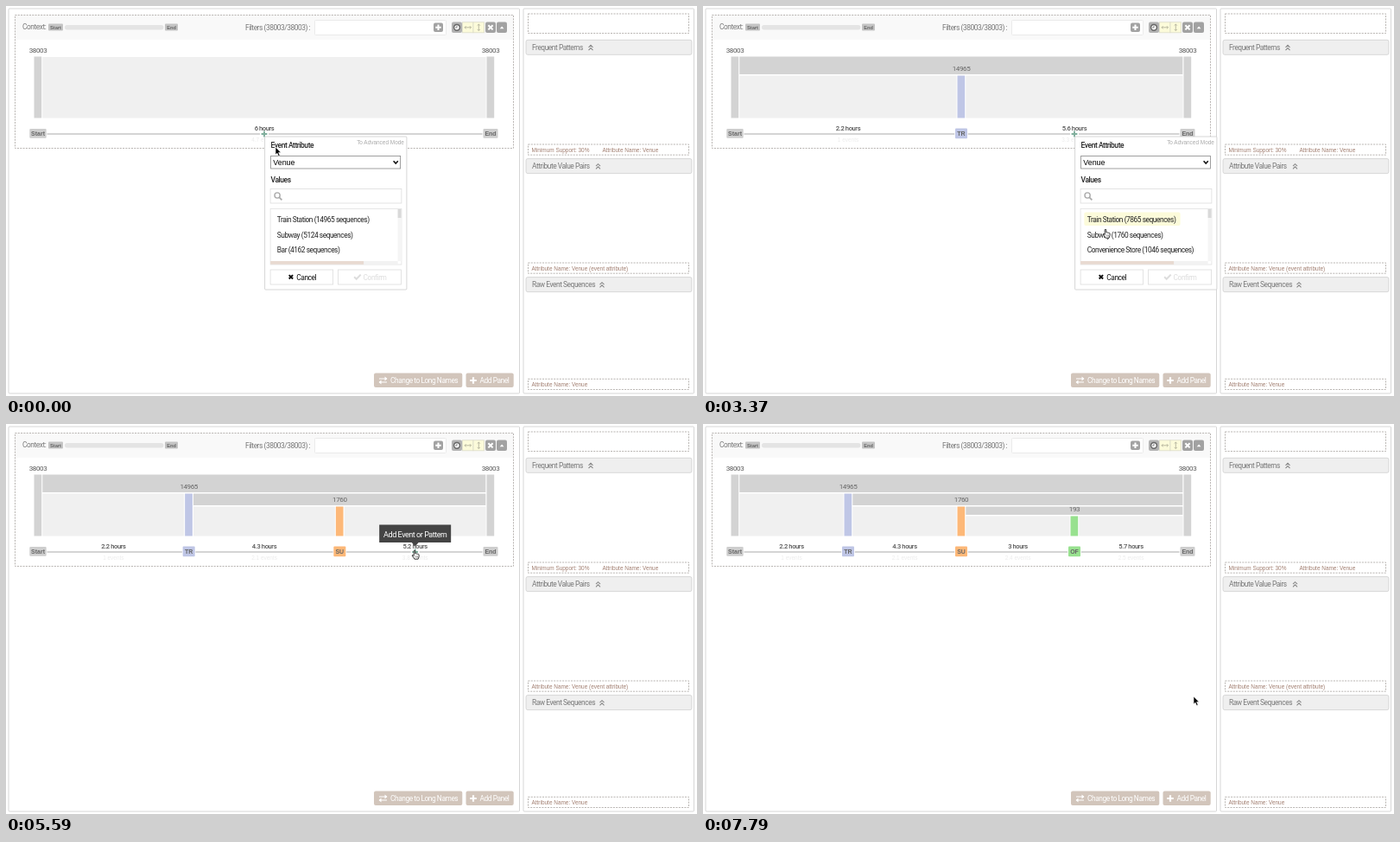
An HTML page for the animation above (7.99 s loop, 800 by 451 pixels).

```html
<!DOCTYPE html>
<html lang="en">
<head>
<meta charset="utf-8">
<title>Event sequence explorer</title>
<style>
  html, body { margin: 0; width: 100%; height: 100%; overflow: hidden; background: #fff; }
  svg { display: block; width: 100%; height: 100%; }
  text { font: 8.4px Roboto, sans-serif; letter-spacing: -.054em; white-space: pre; }
  .title { font-weight: 500; font-size: 8.5px; }
  .hours { font-weight: 500; font-size: 7.6px; }
  .count { font-size: 8.1px; }
  .tip { font-size: 9.1px; }
  .small, .faint, .select, .badge, .tiny { font: 6.45px "Liberation Sans", Arial, sans-serif; letter-spacing: 0; }
  .select { font-size: 8.9px; }
  .badge { font-size: 7px; font-weight: bold; }
  .tiny { font-size: 5.7px; font-weight: bold; }
</style>
</head>
<body>
<svg viewBox="0 0 800 451"><g id="page"></g><g id="live"></g></svg>
<script>
const LOOP = 7990;
const START_X = 37, END_X = 561;

const EVENTS = [
  { code: 'TR', count: 14965, color: '#bfc6e6', top: 58, bar: 80 },
  { code: 'SU', count: 1760, color: '#fdb878', top: 80, bar: 95 },
  { code: 'OF', count: 193, color: '#98e18f', top: 95, bar: 106 },
];

// One entry per number of events on the axis.
const GAPS = [
  [['6 hours', '4.7 events']],
  [['2.2 hours', '1 events'], ['5.6 hours', '3.3 events']],
  [['2.2 hours', '1 events'], ['4.3 hours', '2.1 events'], ['5.2 hours', '3.8 events']],
  [['2.2 hours', '1 events'], ['4.3 hours', '2.1 events'], ['3 hours', '2.4 events'], ['5.7 hours', '2.5 events']],
];

const CHOICES = [
  ['Train Station (14965 sequences)', 'Subway (5124 sequences)', 'Bar (4162 sequences)'],
  ['Train Station (7865 sequences)', 'Subway (1760 sequences)', 'Convenience Store (1046 sequences)'],
  ['Subway (732 sequences)', 'Train Station (715 sequences)', 'Office (193 sequences)'],
];

// [start ms, events on axis, cursor, x, y, options]
const STEPS = [
  [0, 0, 'arrow', 312, 163, { dialog: 1 }],
  [190, 0, 'arrow', 320, 205, { dialog: 1 }],
  [390, 0, 'hand', 338, 244, { dialog: 1, hover: 0 }],
  [590, 0, 'hand', 338, 244, { dialog: 1, pick: 0 }],
  [790, 0, 'arrow', 378, 284, { dialog: 1, pick: 0 }],
  [990, 0, 'hand', 420, 319, { dialog: 1, pick: 0 }],
  [1190, 0, 'hand', 420, 319, { plus: 1 }],
  [1370, 1, 'arrow', 420, 319, { fade: 1 }],
  [1570, 1, 'arrow', 423, 260, {}],
  [1770, 1, 'arrow', 427, 185, {}],
  [1970, 1, 'hand', 429, 146, { plus: 1, tip: 1 }],
  [2370, 1, 'hand', 429, 146, { plus: 1 }],
  [2590, 1, 'arrow', 432, 160, { dialog: 1 }],
  [2790, 1, 'arrow', 440, 195, { dialog: 1 }],
  [2990, 1, 'arrow', 450, 226, { dialog: 1 }],
  [3190, 1, 'hand', 461, 244, { dialog: 1, hover: 0 }],
  [3370, 1, 'hand', 466, 258, { dialog: 1, hover: 0 }],
  [3590, 1, 'hand', 467, 262, { dialog: 1, hover: 1 }],
  [3790, 1, 'hand', 467, 262, { dialog: 1, pick: 1 }],
  [3990, 1, 'arrow', 505, 288, { dialog: 1, pick: 1 }],
  [4190, 1, 'arrow', 535, 309, { dialog: 1, pick: 1 }],
  [4590, 1, 'arrow', 535, 309, { plus: 1 }],
  [4790, 2, 'arrow', 535, 309, { fade: 1 }],
  [4990, 2, 'arrow', 520, 260, {}],
  [5190, 2, 'arrow', 490, 190, {}],
  [5390, 2, 'hand', 473, 146, { plus: 1 }],
  [5590, 2, 'hand', 473, 146, { plus: 1, tip: 1 }],
  [5790, 2, 'arrow', 477, 160, { dialog: 1 }],
  [5990, 2, 'arrow', 492, 229, { dialog: 1 }],
  [6190, 2, 'hand', 502, 246, { dialog: 1, hover: 0 }],
  [6390, 2, 'hand', 509, 263, { dialog: 1, hover: 1 }],
  [6590, 2, 'hand', 516, 281, { dialog: 1, hover: 2 }],
  [6790, 2, 'hand', 516, 281, { dialog: 1, pick: 2 }],
  [6990, 2, 'arrow', 585, 306, { dialog: 1, pick: 2 }],
  [7190, 2, 'arrow', 568, 315, { dialog: 1, pick: 2 }],
  [7370, 2, 'arrow', 568, 315, { plus: 1 }],
  [7590, 3, 'arrow', 568, 315, { fade: 1 }],
  [7790, 3, 'arrow', 568, 315, {}],
];

// Boxes are given by their left, top, right and bottom edges.
const box = (l, t, r, b, fill, extra = '') =>
  `<rect x="${l}" y="${t}" width="${r - l}" height="${b - t}" fill="${fill}" ${extra}/>`;
const border = (color, radius = 0) => `stroke="${color}" stroke-width=".8" rx="${radius}"`;
const dashed = (l, t, r, b) => box(l, t, r, b, 'none', 'stroke="#b0aca9" stroke-width=".9" stroke-dasharray="2 1.3"');
const text = (x, y, label, fill, cls = '', anchor = 'start') =>
  `<text x="${x}" y="${y}" fill="${fill}" class="${cls}" text-anchor="${anchor}">${label}</text>`;
const centered = (x, y, label, fill, cls) => text(x, y, label, fill, cls, 'middle');
const line = (d, color, width = 1) => `<path d="${d}" fill="none" stroke="${color}" stroke-width="${width}"/>`;
const shape = (d, fill, extra = '') => `<path d="${d}" fill="${fill}" ${extra}/>`;
const plus = (x, y, r, color, width) => line(`M${x - r} ${y}h${2 * r}M${x} ${y - r}v${2 * r}`, color, width);
const cross = (x, y, r, color) =>
  line(`M${x - r} ${y - r}l${2 * r} ${2 * r}M${x + r} ${y - r}l${-2 * r} ${2 * r}`, color, 2);

function header(y, label, chevronX) {
  const chevron = dy => `M${chevronX - 2.5} ${y + dy}l2.5 -2.5l2.5 2.5`;
  return box(602, y, 794, y + 17, '#efefef', border('#d0d0d0', 2)) +
    text(609, y + 11.8, label, '#777') +
    line(chevron(8.6) + chevron(11.8), '#888', 1.1);
}

function drawPage() {
  const note = '#a17e70', tan = '#d2c5bb';
  return box(0, 0, 800, 451, '#fff') +
    box(3, 3, 594.5, 448, '#fff', border('#ccc', 1)) +
    box(599, 3, 796.5, 448, '#fff', border('#ccc', 1)) +
    box(10.5, 10.5, 587, 39, '#f9f9f9') + dashed(10.5, 10.5, 587.5, 164.5) +
    text(19, 27, 'Context:', '#777') +
    box(49, 20.5, 66, 28.5, '#c4c4c4', 'rx="1"') + centered(57.5, 26.7, 'Start', '#666', 'tiny') +
    box(68, 22, 182.5, 27.5, '#e4e4e4', 'rx="2.7"') +
    box(184, 20.5, 199, 28.5, '#c4c4c4', 'rx="1"') + centered(191.5, 26.7, 'End', '#666', 'tiny') +
    text(277, 28.3, 'Filters (38003/38003) :', '#777') +
    box(357.5, 16.5, 509.5, 33.5, '#fff', border('#e6e6e6', 1)) +
    box(495, 19.5, 506, 30, '#a2a2a2', 'rx="2"') + plus(500.5, 24.8, 3.2, '#fff', 2) +
    box(516, 18.5, 528, 31, '#b2b2b2', 'rx="2"') +
    '<circle cx="522" cy="24.8" r="3.4" fill="#fff" stroke="#666" stroke-width="1.5"/>' +
    line('M522 22.8v2.2h-1.8', '#666', .8) +
    box(528.5, 18.8, 541, 30.8, '#fcfbda', border('#dddcc8')) +
    box(541, 18.8, 553.5, 30.8, '#fcfbda', border('#dddcc8')) +
    line('M531 24.8h7.5M532.6 23.2l-1.6 1.6l1.6 1.6M536.9 23.2l1.6 1.6l-1.6 1.6', '#b5b49c', .9) +
    line('M547.3 21v7.5M545.7 22.6l1.6 -1.6l1.6 1.6M545.7 26.9l1.6 1.6l1.6 -1.6', '#b5b49c', .9) +
    box(555, 18.5, 567, 31, '#a2a2a2', 'rx="2"') + cross(561, 24.8, 2.6, '#fff') +
    box(568, 18.5, 580, 31, '#a2a2a2', 'rx="2"') + shape('M571.7 26.2l2.4 -2.8l2.4 2.8z', '#fff') +
    dashed(604.5, 9, 790.5, 31.5) +
    header(39.3, 'Frequent Patterns', 677) +
    header(176.6, 'Attribute Value Pairs', 685.5) +
    header(313.6, 'Raw Event Sequences', 690) +
    [160, 297, 431.3].map(y => dashed(604.5, y, 790.5, y + 12.2)).join('') +
    text(608.5, 168.8, 'Minimum Support: 30%', note, 'small') +
    text(690.5, 168.8, 'Attribute Name: Venue', note, 'small') +
    text(608.5, 305.6, 'Attribute Name: Venue (event attribute)', note, 'small') +
    text(608.5, 439.8, 'Attribute Name: Venue', note, 'small') +
    box(426, 424.5, 528.3, 441, tan, 'rx="2"') + text(445, 436, 'Change to Long Names', '#fff') +
    line('M432 431h8.5M432.5 435h8.5', '#fff', 1.2) +
    shape('M438.5 428.6l3 2.4l-3 2.4zM434.5 432.6l-3 2.4l3 2.4z', '#fff') +
    box(532.5, 424.5, 587.7, 441, tan, 'rx="2"') + text(548.5, 436, 'Add Panel', '#fff') +
    plus(541, 433, 3.8, '#fff', 2.2);
}

const nodeX = (index, events) => START_X + (END_X - START_X) * index / (events + 1);
const lastGapX = events => nodeX(events + .5, events);

function drawChart(events, showPlus) {
  let out = '';
  for (const [x, name, half] of [[START_X, 'Start', 9.7], [END_X, 'End', 8.5]]) {
    out += box(x - 4.5, 58.5, x + 4.2, 129.5, '#d3d3d3') +
      centered(x, 53.5, '38003', '#555', 'count') +
      box(x - half, 142, x + half, 152.7, '#cecece', 'rx="1"') +
      centered(x, 150, name, '#666', 'badge');
  }
  GAPS[events].forEach(([hours, average], i) => {
    const left = nodeX(i, events), right = nodeX(i + 1, events), mid = (left + right) / 2;
    const top = events ? EVENTS[Math.min(i, events - 1)].bar : 58.5;
    const from = left + (i ? 7.8 : 10.5), to = right - (i < events ? 7.8 : 9.5);
    const hole = showPlus && i === events;
    out += box(left + 5.3, top + .5, right - 5.5, 129.5, '#f0f0f0') +
      line(hole ? `M${from} 148H${mid - 5}M${mid + 5} 148H${to}` : `M${from} 148H${to}`, '#c6c6c6', 1.3) +
      centered(mid, 144, hours, '#555', 'hours') +
      centered(mid, 157, average, '#ececec', 'faint');
  });
  EVENTS.slice(0, events).forEach(({ code, count, color, top, bar }, i) => {
    const x = nodeX(i + 1, events);
    out += box(nodeX(i, events) + 5.3, top + .5, 555.3, bar - 1, '#d3d3d3') +
      box(x - 4.5, bar + .5, x + 4.2, 129.5, color) +
      centered(x, [75, 90, 101.3][i], count, '#666', 'count') +
      box(x - 7, 141.5, x + 7, 153.2, color, 'rx="1"') +
      centered(x, 150.3, code, '#666', 'badge');
  });
  return out + (showPlus ? plus(lastGapX(events), 148, 3.4, '#7fae9c', 1.9) : '');
}

function drawDialog(x, rows, { hover, pick }) {
  const ready = pick === undefined ? '#ddd' : '#111';
  const items = rows.map((label, i) => {
    const y = 250 + 17.7 * i, right = x + 17 + label.length * 3.5;
    const back = i === pick ? box(x + 10.7, y - 11.5, right, y + 4, '#fff', border('#aaa', 2))
      : i === hover ? box(x + 10.7, y - 11.5, right, y + 4, '#fcfbda', 'rx="2"') : '';
    return back + text(x + 14.2, y, label, '#222');
  }).join('');
  return box(x, 151, x + 164.3, 328, '#fff', border('#ccc', 1)) +
    text(x + 7, 164.3, 'Event Attribute', '#222', 'title') +
    text(x + 161.3, 160.3, 'To Advanced Mode', '#aaa', 'small', 'end') +
    box(x + 7, 173.5, x + 157, 188, '#fff', border('#888')) +
    text(x + 9.7, 184, 'Venue', '#000', 'select') +
    line(`M${x + 149} 179.3l2.6 2.8l2.6 -2.8`, '#111', 1.5) +
    text(x + 7, 203.6, 'Values', '#222', 'title') +
    box(x + 6.5, 211.5, x + 158.3, 228, '#fff', border('#ddd')) +
    `<circle cx="${x + 14.5}" cy="219" r="3.1" fill="none" stroke="#aaa" stroke-width="1.4"/>` +
    line(`M${x + 16.8} 221.4l3 3`, '#aaa', 1.7) +
    box(x + 6.5, 234.5, x + 158.3, 299, '#fff', border('#e2e2e2')) + items +
    box(x + 154, 235, x + 158, 295, '#f5f5f5') + box(x + 154, 235, x + 158, 245, '#d9d9d9') +
    box(x + 6.5, 295, x + 154, 298.8, '#f2f2f2') + box(x + 6.5, 295, x + 114.5, 298.8, '#e8dad1') +
    box(x + 6.5, 305, x + 79, 322, '#fff', border('#ddd')) +
    cross(x + 30.3, 313.3, 2.2, '#111') + text(x + 36.7, 316.6, 'Cancel', '#111') +
    box(x + 84.8, 305, x + 158, 322, '#fff', border('#ddd')) +
    line(`M${x + 103.5} 313.3l2.6 2.5l5 -5.2`, ready, 2) + text(x + 114, 316.6, 'Confirm', ready);
}

const drawTip = x => box(x - 41.5, 116.5, x + 41.5, 137, '#444') +
  shape(`M${x - 4} 137h8l-4 4.5z`, '#444') + centered(x, 130.8, 'Add Event or Pattern', '#fff', 'tip');

const CURSORS = {
  arrow: shape('M0 0V9l2 -1.8l1.5 3.4l1.6 -.7l-1.5 -3.3h2.7z', '#000', 'stroke="#fff" stroke-width=".6"'),
  hand: shape('M-.8 .7q.8 -1.2 1.6 0v3.2q1 -.8 1.5 .2q1 -.5 1.5 .4q1.2 -.3 1.3 .8v2.2l-1 2.7h-4.2q-1 -2 -2.9 -4.2q.3 -1.2 2.2 .4z',
    '#fff', 'stroke="#222" stroke-width=".9" stroke-linejoin="round"') +
    line('M1 6.5v2M2.3 6.5v2M3.6 6.5v2', '#444', .5),
};

function drawStep([, events, cursor, x, y, options]) {
  const { dialog, fade, tip } = options;
  const anchor = lastGapX(events);
  return `<g opacity="${fade ? .5 : 1}">${drawChart(events, dialog || options.plus)}</g>` +
    (dialog ? drawDialog(anchor + .6, CHOICES[events], options) : '') +
    (tip ? drawTip(anchor) : '') +
    `<g transform="translate(${x} ${y})">${CURSORS[cursor]}</g>`;
}

const live = document.getElementById('live');
let shown;

function render() {
  const time = performance.now() % LOOP;
  const step = STEPS.findLast(([start]) => start <= time);
  if (step !== shown) live.innerHTML = drawStep(shown = step);
  requestAnimationFrame(render);
}

document.getElementById('page').innerHTML = drawPage();
render();
</script>
</body>
</html>
```
